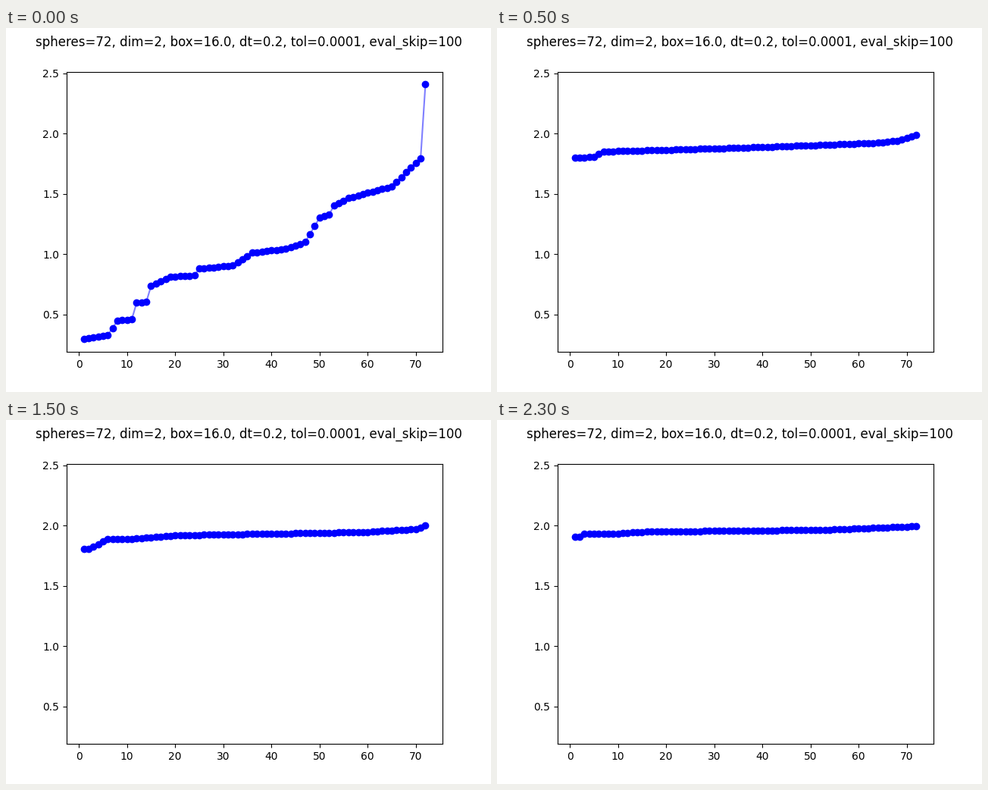
Animation, 640 px wide and 480 px high, one loop 2500 ms. Source, as a matplotlib script:

```python
import numpy as np
import matplotlib.pyplot as plt
from matplotlib.animation import FuncAnimation

COUNT = 72
ranks = np.arange(1, COUNT + 1)


def curve(*points):
    """Sorted distances, straight between a few (rank, distance) points."""
    return np.interp(ranks, *zip(*points))


stages = [
    # random start
    curve((1, .2956), (6, .33), (8, .448), (11, .462), (12, .598), (14, .605),
          (15, .737), (19, .811), (24, .826), (25, .881), (32, .907),
          (36, 1.012), (43, 1.046), (47, 1.1), (50, 1.302), (52, 1.33),
          (53, 1.403), (56, 1.466), (65, 1.562), (71, 1.795), (72, 2.408)),
    # relaxing towards an even spacing
    curve((1, 1.8), (5, 1.807), (7, 1.851), (40, 1.888), (63, 1.922),
          (68, 1.94), (72, 1.99)),
    curve((1, 1.82), (2, 1.82), (4, 1.87), (12, 1.877), (21, 1.901),
          (62, 1.94), (72, 1.983)),
    curve((1, 1.807), (2, 1.807), (6, 1.887), (10, 1.889), (21, 1.92),
          (59, 1.946), (70, 1.971), (72, 2.0)),
    curve((1, 1.907), (2, 1.907), (3, 1.931), (9, 1.933), (16, 1.95),
          (53, 1.965), (72, 1.995)),
]

plt.rcParams["font.family"] = "DejaVu Sans"
fig, ax = plt.subplots(figsize=(6.4, 4.8), dpi=100)
fig.suptitle("spheres=72, dim=2, box=16.0, dt=0.2, tol=0.0001, eval_skip=100")
link, = ax.plot(ranks, stages[0], "b-", alpha=0.5)
dots, = ax.plot(ranks, stages[0], "bo")

# keep the limits of the widest stage
ax.autoscale_view()
ax.autoscale(False)


def update(i):
    for line in (link, dots):
        line.set_ydata(stages[i])
    return link, dots


anim = FuncAnimation(fig, update, frames=len(stages), interval=500,
                     repeat=True, repeat_delay=0)
plt.show()
```
